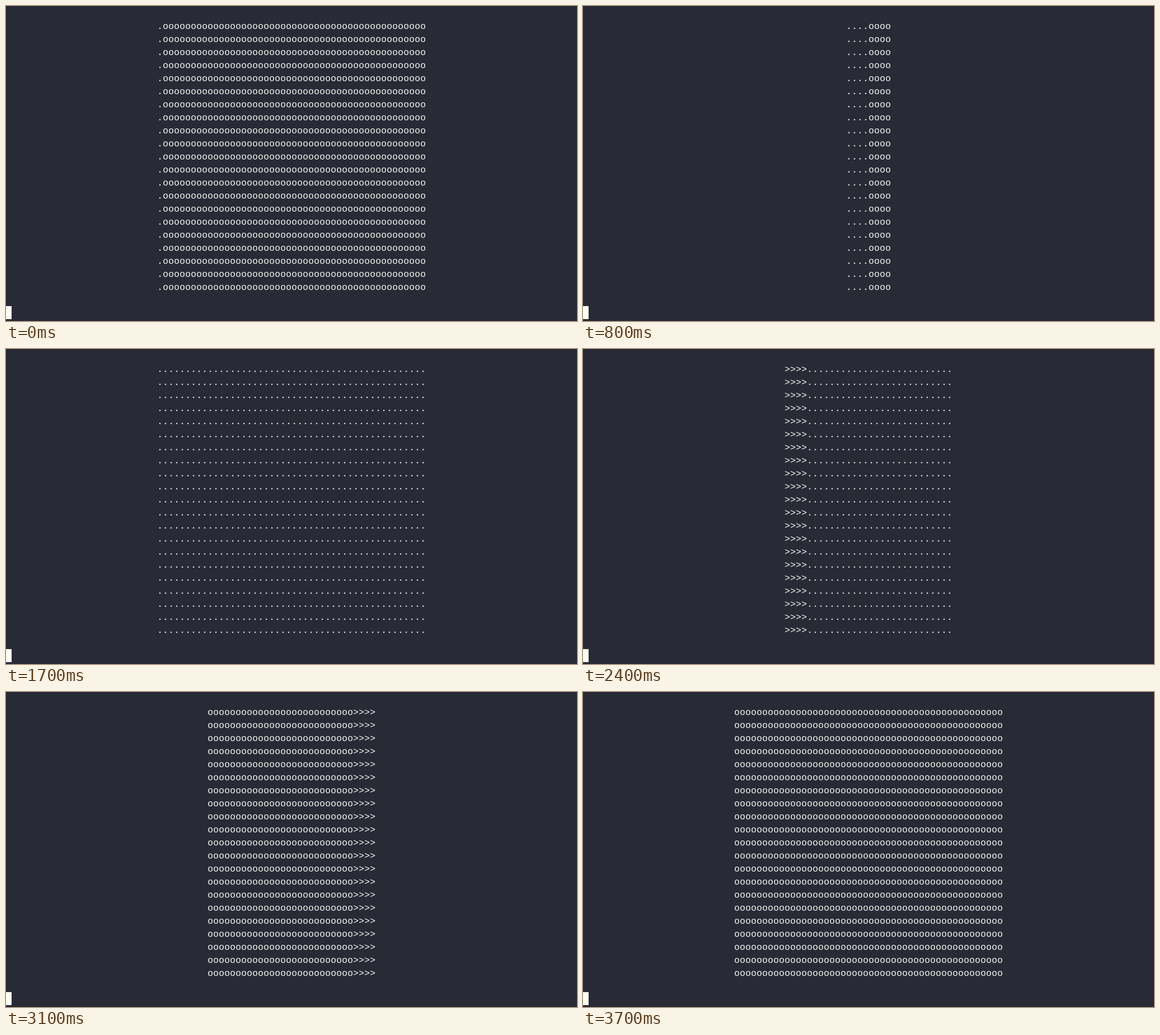
Write an HTML page with a canvas that moves like this. It is 918 px wide and 507 px high and loops after 3800 ms.

```html
<!DOCTYPE html>
<html lang="en">
<head>
<meta charset="utf-8">
<title>Spinning ASCII slab</title>
<style>
  html, body { margin: 0; width: 100%; height: 100%; overflow: hidden; background: #282a36; }
  canvas { display: block; }
</style>
</head>
<body>
<canvas id="stage" width="918" height="507"></canvas>
<script>
const ctx = document.getElementById('stage').getContext('2d');
const CELL_W = 9, CELL_H = 21, BASELINE = 16;
const COLS = 102, TOP_ROW = 1, ROWS = 21, CURSOR_ROW = 23;
const HALF_WIDTH = 24, HALF_DEPTH = 2;
const STEPS = 38, STEP_MS = 100;

// One line of the slab, turned about its vertical axis and seen flat on.
function slabLine(angle) {
  const cos = Math.cos(angle), sin = Math.sin(angle);
  const face = cos > 0 ? 'o' : '.';
  const side = sin > 0 ? '.' : '>';
  const faceX = HALF_DEPTH * sin * Math.sign(cos);
  const faceHalf = HALF_WIDTH * Math.abs(cos);
  const fullHalf = faceHalf + HALF_DEPTH * Math.abs(sin);
  let line = '';
  for (let col = 0; col < COLS; col++) {
    const x = col + 0.5 - COLS / 2;
    if (Math.abs(x - faceX) <= faceHalf) line += face;
    else if (Math.abs(x) <= fullHalf) line += side;
    else line += ' ';
  }
  return line;
}

function draw(step) {
  ctx.fillStyle = '#282a36';
  ctx.fillRect(0, 0, 918, 507);
  ctx.fillStyle = '#f8f8f2';
  ctx.font = '15px "Liberation Mono", monospace';
  const line = slabLine((step + 1) * 2 * Math.PI / STEPS);
  for (let row = TOP_ROW; row < TOP_ROW + ROWS; row++) {
    ctx.fillText(line, 0, row * CELL_H + BASELINE);
  }
  ctx.fillStyle = '#fffff5';
  ctx.fillRect(0, CURSOR_ROW * CELL_H, CELL_W, CELL_H);
}

const start = performance.now();
function tick() {
  draw(Math.floor((performance.now() - start) / STEP_MS) % STEPS);
  requestAnimationFrame(tick);
}
tick();
</script>
</body>
</html>
```
